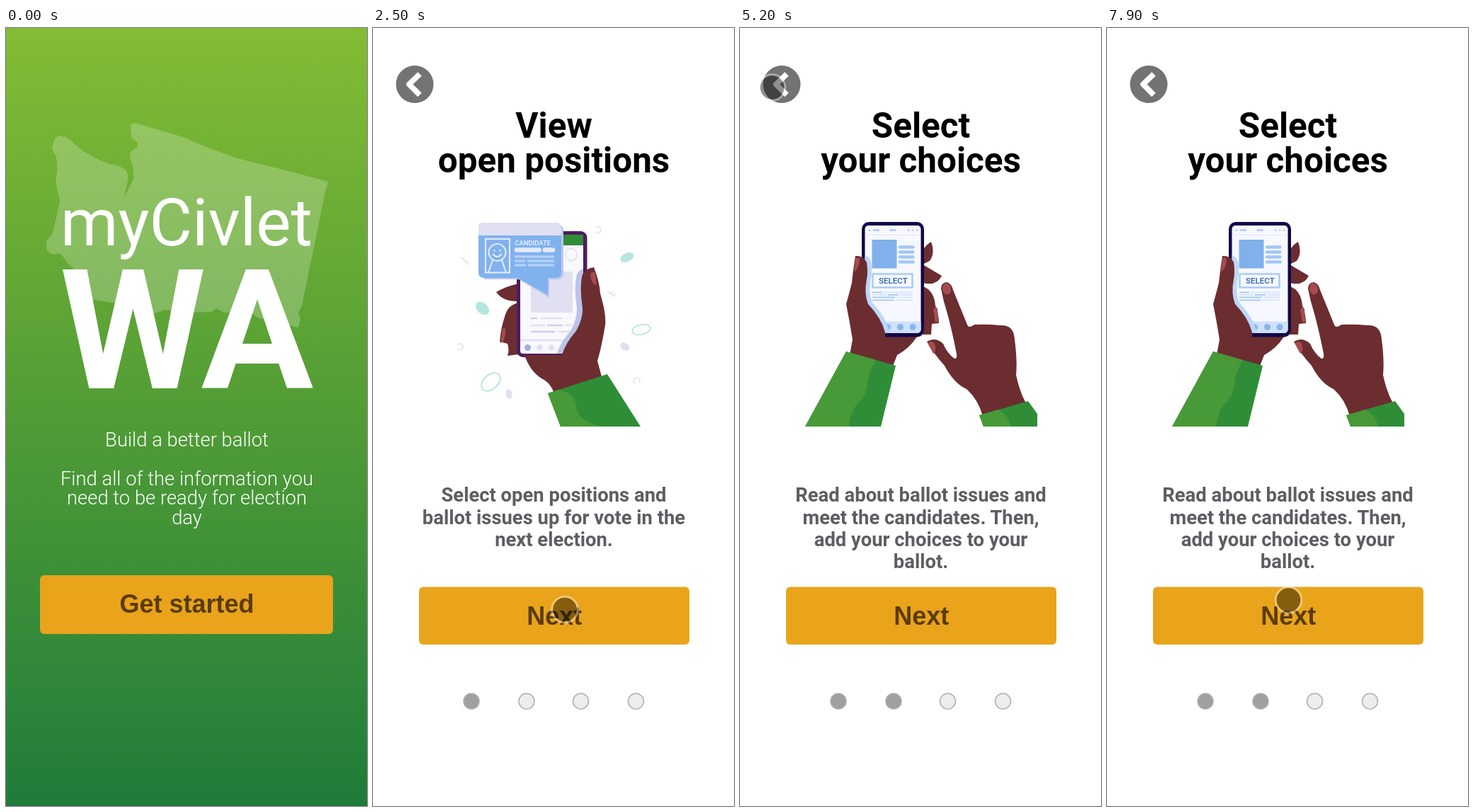
Animation of 510 by 1099 pixels, one loop 8000 ms. Source, as an HTML page:

```html
<!DOCTYPE html>
<html lang="en">
<head>
<meta charset="utf-8">
<title>Ballot guide</title>
<style>
  html, body { margin: 0; width: 100%; height: 100%; overflow: hidden; background: #fff; }
  svg { display: block; width: 510px; height: 1099px; }
  text { font-family: Roboto, sans-serif; text-anchor: middle; }
  .title { font-size: 49.4px; font-weight: 700; }
  .body { font-size: 27.4px; font-weight: 700; fill: #5d5e63; }
  .intro { font-size: 27.4px; font-weight: 300; fill: #fff; }
  .label { font: 700 36px "Liberation Sans", Arial, sans-serif; fill: #5a3c08; }
  .gold { fill: #e9a41b; }
  .skin { fill: #6b2d30; }
  .nail { fill: #a64c50; }
  .dark { fill: #2f8d37; }
  .leaf { fill: #479a37; }
  .mint { fill: #b3e6df; }
  .lilac { fill: #e0e0f2; }
  .line { fill: none; }
</style>
</head>
<body>
<svg viewBox="0 0 510 1099">
  <defs>
    <linearGradient id="sky" x2="0" y2="1">
      <stop offset="0" stop-color="#83bc34"/>
      <stop offset=".5" stop-color="#519c36"/>
      <stop offset=".85" stop-color="#2e863a"/>
      <stop offset="1" stop-color="#1f7b39"/>
    </linearGradient>
    <clipPath id="glassA"><rect x="208" y="292" width="89" height="168" rx="4"/></clipPath>
    <clipPath id="glassB"><rect x="176.500" y="279" width="79" height="152" rx="5"/></clipPath>
    <path id="gripA" d="M295 352Q297 340 312 338Q320 358 321 375Q330 405 328 420Q322 455 317 470L324 496L256 516Q250 500 238 495Q222 485 214 462H267Q272 445 287 428Q297 410 296 395Q292 370 295 352Z"/>
    <path id="gripB" d="M163 322Q174 321 179 331Q181 345 179 355Q175 375 181 390Q200 410 205 430V436H250Q240 452 222 462L215 480L155 462L159 440Q155 415 150 390Q155 372 158 360Q160 340 163 322Z"/>
  </defs>

  <g id="welcome">
    <rect width="510" height="1099" fill="url(#sky)"/>
    <path fill="#fff" opacity=".22" d="M76 152Q67 153 65 170L71 182Q74 198 70 215L76 245L66 290L58 300Q55 309 59 316L66 320L75 318Q82 323 85 330L100 345L105 362Q109 378 118 383L150 388L200 397L210 403L225 398L250 402L290 401L297 396L308 402L325 402L340 398L356 409L370 413L413 423L416 410L413 402L418 392L451 232L455 217Q385 198 330 185Q290 172 250 154L182 134Q176 134 176 140L177 155L186 162V168L176 175L175 185Q181 193 180 213L172 230Q165 238 164 248L170 225Q174 212 171 203Q166 195 145 192Q115 180 100 167Q88 153 76 152Z"/>
    <text x="255" y="307" font-size="93" fill="#fff">myCivlet</text>
    <text x="76 275.500" y="509" font-size="236" font-weight="700" fill="#fff" style="text-anchor:start">WA</text>
    <g class="intro">
      <text x="255.500" y="591">Build a better ballot</text>
      <text x="255.500" y="646">Find all of the information you</text>
      <text x="255.500" y="673">need to be ready for election</text>
      <text x="255.500" y="701">day</text>
    </g>
    <rect class="gold" x="48" y="773" width="414" height="83" rx="6"/>
    <text class="label" x="255.500" y="826">Get started</text>
  </g>

  <g id="steps">
    <rect width="510" height="1099" fill="#fff"/>
    <circle cx="59" cy="79.500" r="26.500" fill="#737373"/>
    <path class="line" d="M66 65L51 79.500L66 94.500" stroke="#fff" stroke-width="7.800" stroke-linejoin="round"/>
    <rect class="gold" x="65" y="789.500" width="382" height="81.500" rx="6"/>
    <text class="label" x="256.300" y="843">Next</text>
    <g id="dots" stroke="#aeafb1" stroke-width="1.500"></g>
  </g>

  <g id="view">
    <g class="title">
      <text x="255.500" y="154.700">View</text>
      <text x="255.500" y="203.700">open positions</text>
    </g>
    <g class="body">
      <text x="255.500" y="668.500">Select open positions and</text>
      <text x="255.500" y="700.500">ballot issues up for vote in the</text>
      <text x="255.500" y="731.500">next election.</text>
    </g>

    <ellipse class="mint" rx="10" ry="6" transform="translate(359 324) rotate(-24)"/>
    <ellipse class="mint" rx="11" ry="7.500" transform="translate(154.500 396) rotate(42)"/>
    <ellipse class="lilac" rx="7" ry="5" transform="translate(356 450) rotate(38)"/>
    <ellipse class="lilac" rx="4.500" ry="7" transform="translate(192 517) rotate(-12)"/>
    <g class="line" stroke="#b3e6df" stroke-width="1.800">
      <ellipse rx="13" ry="7" transform="translate(379 426) rotate(-12)"/>
      <ellipse rx="15.500" ry="10" transform="translate(166.500 500) rotate(-42)"/>
    </g>
    <path class="line" stroke="#e3e3ea" stroke-width="1.600" d="M314 282a4.500 4.500 0 1 1 0 6M119 448a4.500 4.500 0 1 1 0 5M370 502a4.500 4.500 0 1 1 6 -1M124 325h4l1 5h4v5M331 371l4 4l3 -2l1 6l4 -3"/>

    <path class="skin" d="M174 373Q190 364 206 361V386Q184 387 174 373ZM206 388Q190 391 186 408Q181 422 179 443L190 446Q193 455 190 463L206 461Z"/>
    <path class="nail" d="M180 445L183 425Q188 420 187 432L184 444Z"/>
    <rect x="203" y="287" width="99.500" height="178" rx="9" fill="#4d1c5f"/>
    <g clip-path="url(#glassA)">
      <rect x="208" y="292" width="89" height="168" fill="#f8f8fe"/>
      <rect class="dark" x="208" y="292" width="89" height="15"/>
      <circle class="line" cx="280" cy="320" r="8.500" stroke="#dcdcf0" stroke-width="1.300"/>
      <rect class="lilac" x="223" y="344" width="59" height="58"/>
      <path stroke="#cfcfea" stroke-width="2.500" d="M223 410h9M246 420h22M223 429h34"/>
      <path stroke="#e0e0f2" stroke-width="2.500" d="M237 410h31M223 420h20M271 420h10M262 429h20M208 441h89"/>
      <circle cx="218.500" cy="451.500" r="4.500" fill="#9fb0dd"/>
      <circle class="lilac" cx="235.500" cy="451.500" r="4"/>
      <circle class="lilac" cx="252" cy="451.500" r="4"/>
      <use href="#gripA" x="-8" fill="#bcc3e8"/>
    </g>
    <use href="#gripA" class="skin"/>
    <path class="nail" d="M307 347Q311 343 314 346L316 363Q308 362 307 347Z"/>

    <path fill="#bfc5ee" d="M157 278H262Q269 278 269 286V347Q269 355 261 355H249V381L206 355H157Z"/>
    <path fill="#80b2ee" d="M157 275H258Q266 275 266 283V345Q266 353 258 353H247V377L204 353H157Q149 353 149 345V283Q149 275 157 275Z"/>
    <path class="lilac" d="M149 293V283Q149 275 157 275H258Q266 275 266 283V293Z"/>
    <g class="line" stroke="#e3e9f9" stroke-width="2.200">
      <rect x="159" y="298" width="34" height="47.500"/>
      <circle cx="175.500" cy="317" r="12"/>
      <path d="M163 345L169 328M188 345L182 328M169 319Q175.500 327 182 319M171.500 313v2.500M179.500 313v2.500"/>
    </g>
    <text x="225.800" y="307" font-size="9.400" font-weight="500" fill="#eef3fc">CANDIDATE</text>
    <path stroke="#e5eafa" stroke-width="6.500" stroke-linecap="round" d="M203 313.500h31.500M243 313.500h11"/>
    <path stroke="#b2d0f7" stroke-width="3.500" d="M200 323h56M200 329h15M218 329h38M200 335h16M219 335h37"/>

    <path class="dark" d="M247 516L331 489L378 563H265Z"/>
    <path class="leaf" d="M247 516L262 511Q289 516 287 538Q293 558 325 563H265Z"/>
  </g>

  <g id="select">
    <g class="title">
      <text x="255.500" y="154.700">Select</text>
      <text x="255.500" y="203.700">your choices</text>
    </g>
    <g class="body">
      <text x="255.500" y="668.500">Read about ballot issues and</text>
      <text x="255.500" y="700.500">meet the candidates. Then,</text>
      <text x="255.500" y="731.500">add your choices to your</text>
      <text x="255.500" y="763">ballot.</text>
    </g>

    <path class="skin" d="M258 314Q264 305 270 302Q276 318 268 329L258 334ZM258 334L285 350Q278 365 258 360ZM258 365Q274 370 276 392Q281 405 281 417L271 418L270 433H258Z"/>
    <path class="nail" d="M273 398Q277 391 279 397L280 415L276 416Z"/>
    <rect x="172" y="274" width="88" height="162.500" rx="10" fill="#120848"/>
    <g clip-path="url(#glassB)">
      <rect x="176" y="279" width="80" height="152" fill="#f7f8ff"/>
      <path stroke="#b5d0f7" stroke-width="3" stroke-linecap="round" d="M183 285.500h.1M189 285.500h7M212.500 285.500h7M238 285.500h.1M244 285.500h.1M250 285.500h.1"/>
      <path stroke="#dde7fb" d="M176 292.500h80"/>
      <rect x="186.500" y="299" width="35" height="40.500" fill="#80b1ec"/>
      <path stroke="#a2c6f7" stroke-width="4.500" stroke-linecap="round" d="M226 309.500h18.500M226 316.500h18.500M226 323.500h18.500M226 330.500h18.500"/>
      <rect class="line" x="187.500" y="347.500" width="56" height="19" stroke="#a9cbf7" stroke-width="2.500"/>
      <text x="216.300" y="361.300" font-size="11.600" font-weight="500" fill="#2c61ae">SELECT</text>
      <path stroke="#a9cbf7" stroke-width="2" d="M187 373.500h14M209 377h15M187 380.500h32M187 384.500h30"/>
      <path stroke="#d7e5fb" stroke-width="2" d="M203 373.500h41M187 377h20M226 377h18M221 380.500h23M219 384.500h25"/>
      <rect x="176" y="414.500" width="80" height="17" fill="#cfe1fb"/>
      <g fill="#8ab6ef">
        <circle cx="208.500" cy="422.500" r="4.500"/>
        <circle cx="226.500" cy="422.500" r="4.500"/>
        <circle cx="244" cy="422.500" r="4.500"/>
      </g>
      <use href="#gripB" x="6" y="-2" fill="#bcd7fa"/>
    </g>
    <use href="#gripB" class="skin"/>
    <path d="M205 431.500H256Q253 436.500 248 436.500H205Z" fill="#120848"/>
    <path class="nail" d="M163 326Q168 322 169 327Q168 340 161 345Z"/>
    <path class="dark" d="M150 457L220 477L199 563H92Z"/>
    <path class="leaf" d="M150 457L192 469Q181 486 180 505Q178 521 165 532Q155 545 154 563H92Z"/>

    <path class="skin" d="M284 368Q284 360 292 359Q299 361 301 370L321 419Q323 425 331 419Q350 418 368 420Q387 419 388 440Q392 470 390 490Q395 514 404 530L343 549Q337 525 320 510Q302 502 289 477Q272 458 264 443Q276 436 287 446Q293 460 303 467Q307 468 306 460Q299 425 292 400Q287 385 284 368Z"/>
    <ellipse class="nail" rx="6" ry="8" transform="translate(292 368.500) rotate(-12)"/>
    <path class="nail" d="M265 445Q274 440 276 450Q277 458 273 460Z"/>
    <path class="dark" d="M338 547L407 527L420 545V563H344Z"/>
    <path class="leaf" d="M338 547L365 539Q380 548 383 563H344Z"/>
  </g>

  <g id="touch">
    <circle r="17" fill="#000" fill-opacity=".43"/>
    <circle class="line" r="18.300" stroke="#fff" stroke-opacity=".38" stroke-width="3"/>
  </g>
</svg>
<script>
  const LOOP = 8000, TICK = 100;
  const $ = id => document.getElementById(id);

  // [from ms, screen]
  const screens = [[0, "welcome"], [2500, "view"], [4200, "select"], [6300, "view"], [7600, "select"]];

  // [ms, x, y] of the touch pointer
  const path = [
    [1500, 535, 690], [2200, 271, 821.5], [4600, 271, 821.5], [5100, 45.5, 84], [5200, 45.5, 84],
    [5300, 55, 22], [5400, 55, 22], [6000, 73, 96.5], [6400, 73, 96.5], [7000, 256.5, 808], [LOOP, 256.5, 808]
  ];

  const dots = [139, 217, 293.5, 371.5].map(x => {
    const dot = document.createElementNS("http://www.w3.org/2000/svg", "circle");
    dot.setAttribute("cx", x);
    dot.setAttribute("cy", 951);
    dot.setAttribute("r", 11);
    return $("dots").appendChild(dot);
  });

  const show = (id, on) => { $(id).style.display = on ? "" : "none"; };
  const ease = p => p * p * (3 - 2 * p);

  function pointer(t) {
    const i = path.findIndex(p => p[0] > t);
    if (i < 1) return path[0];
    const [t0, x0, y0] = path[i - 1], [t1, x1, y1] = path[i];
    const k = ease((t - t0) / (t1 - t0));
    return [t, x0 + (x1 - x0) * k, y0 + (y1 - y0) * k];
  }

  function draw(t) {
    const screen = screens.filter(s => s[0] <= t).pop()[1];
    for (const id of ["welcome", "view", "select"]) show(id, id === screen);
    show("steps", screen !== "welcome");
    const done = screen === "select" ? 2 : 1;
    dots.forEach((dot, i) => dot.setAttribute("fill", i < done ? "#9fa0a2" : "#ededef"));
    const [, x, y] = pointer(t);
    $("touch").setAttribute("transform", `translate(${x} ${y})`);
  }

  const start = performance.now();
  function frame() {
    const t = (performance.now() - start) % LOOP;
    draw(Math.floor(t / TICK) * TICK);
    requestAnimationFrame(frame);
  }
  frame();
</script>
</body>
</html>
```
